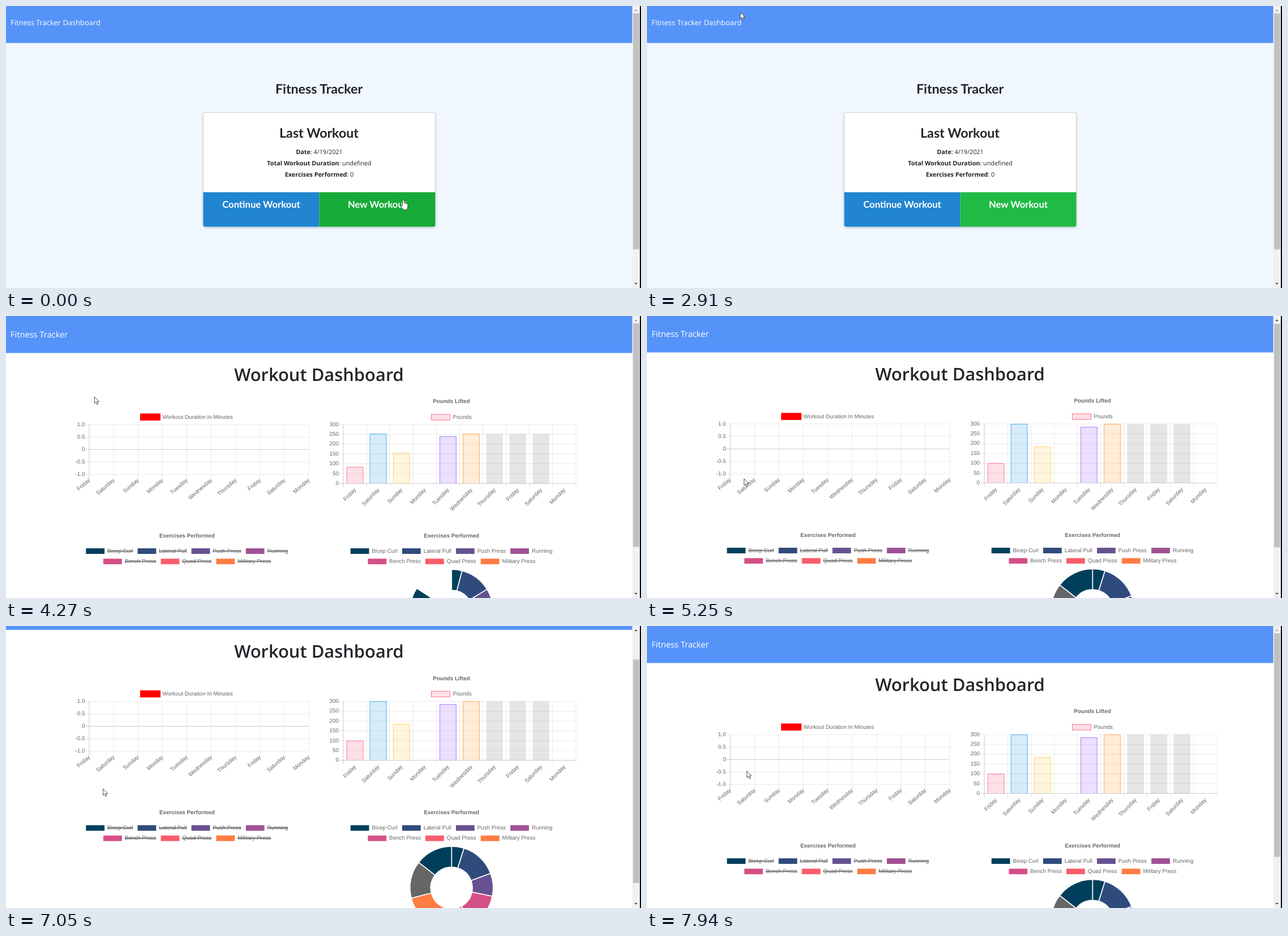
Animation, 1122 px wide and 499 px high, one loop 8 s. Source, as an HTML page with a canvas:

```html
<!DOCTYPE html>
<html lang="en">
<head>
<meta charset="utf-8">
<title>Fitness Tracker</title>
<style>
  html, body { margin: 0; width: 100%; height: 100%; overflow: hidden; background: #fff; }
  canvas { display: block; }
</style>
</head>
<body>
<canvas id="stage" width="1122" height="499"></canvas>
<script>
const ctx = document.getElementById('stage').getContext('2d');
ctx.textRendering = 'geometricPrecision';
const LOOP = 8000, W = 1122, H = 499;
const UI = '"Open Sans", "Noto Sans", sans-serif';
const LATO = 'Lato, sans-serif';
const CHART = '"Liberation Sans", Arial, sans-serif';
const BLUE = '#5593f9', INK = '#212529', GREY = '#666';
const FS = 9.84, UNIT = 0.82;
const DAYS = ['Friday', 'Saturday', 'Sunday', 'Monday', 'Tuesday', 'Wednesday',
              'Thursday', 'Friday', 'Saturday', 'Monday'];
const POUNDS = [100, 300, 185, 0, 285, 300, 300, 300, 300, 0];
const BAR_RGB = ['255,99,132', '54,162,235', '255,206,86', '75,192,192', '153,102,255', '255,159,64'];
const PALETTE = ['#003f5c', '#2f4b7c', '#665191', '#a05195', '#d45087', '#f95d6a', '#ff7c43'];
const LIFTS = ['Bicep Curl', 'Lateral Pull', 'Push Press', 'Running',
               'Bench Press', 'Quad Press', 'Military Press'];

// Pointer moves: start, end, number of steps, cubic path
const MOVES = [
  [310, 880, 7, [702, 343], [600, 320], [440, 190], [381, 126]],
  [1070, 1850, 9, [381, 126], [235, 270], [420, 370], [624, 345]],
  [2140, 2620, 6, [624, 345], [500, 250], [280, 60], [173, 3]],
  [2810, 3200, 5, [173, 3], [166, 10], [155, 18], [148, 25]],
  [3900, 4670, 9, [148, 25], [150, 110], [165, 230], [171, 287.5]],
  [7050, 7340, 4, [171, 287.5], [171, 287.5], [176, 262], [176, 257]],
  [7940, 7940, 1, [176, 257], [176, 257], [176, 256], [176, 256]]
];

const clamp = v => Math.max(0, Math.min(1, v));
const smooth = p => { p = clamp(p); return p * p * (3 - 2 * p); };
const stepAt = (t, a, b, n) =>
  n < 2 ? 0 : Math.min(n - 1, Math.floor((t - a) / (b - a) * (n - 1) + 0.06));

function rect(x, y, w, h, color) {
  ctx.fillStyle = color;
  ctx.fillRect(x, y, w, h);
}

function line(x1, y1, x2, y2, color, width = 1) {
  ctx.strokeStyle = color;
  ctx.lineWidth = width;
  ctx.beginPath();
  ctx.moveTo(x1, y1);
  ctx.lineTo(x2, y2);
  ctx.stroke();
}

function text(str, x, y, font, color, align = 'left', base = 'alphabetic') {
  ctx.font = font;
  ctx.fillStyle = color;
  ctx.textAlign = align;
  ctx.textBaseline = base;
  ctx.fillText(str, x, y);
}

const label = (str, x, y, align, bold = '') =>
  text(str, x, y, `${bold} ${FS}px ${CHART}`, GREY, align, 'middle');

function pointer(t) {
  let pos = MOVES[0][3];
  for (const [a, b, n, p0, p1, p2, p3] of MOVES) {
    if (t < a) break;
    // The pointer rests while the page first scrolls back
    const u = smooth((stepAt(t, a, b, n) + (a === 7050 ? 0 : 1)) / (a === 7050 ? n - 1 : n)), v = 1 - u;
    pos = [0, 1].map(i => v * v * v * p0[i] + 3 * v * v * u * p1[i] + 3 * v * u * u * p2[i] + u * u * u * p3[i]);
  }
  return pos;
}

function scrollTop(t) {
  const max = 97.5;
  if (t < 5250) return 0;
  if (t < 7050) return max * smooth(0.06 + 0.32 * stepAt(t, 5250, 5540, 4));
  return max * (1 - smooth(0.432 + 0.32 * stepAt(t, 7050, 7340, 4)));
}

function drawPointer(x, y, hand) {
  ctx.save();
  ctx.translate(x, y);
  const shape = new Path2D(hand
    ? 'M-1.6 1.5Q0-.6 1.6 1.5V6Q3 5.2 4 6.4Q5.5 5.8 6.4 7.2Q8 7 8 8.6V12Q7.6 15 6.4 17.6H0L-4 11.6Q-4.6 9.4-2.6 10L-1.6 11Z'
    : 'M.5.5V12.2L3.2 9.7L5 14L7 13.2L5.2 9H8.8Z');
  ctx.fillStyle = '#fff';
  ctx.fill(shape);
  ctx.strokeStyle = '#222';
  ctx.lineWidth = 0.8;
  ctx.stroke(shape);
  ctx.restore();
}

function arrow(y, dir, on) {
  ctx.fillStyle = on ? '#505050' : '#a3a3a3';
  ctx.beginPath();
  ctx.moveTo(1110, y + 1.5 * dir);
  ctx.lineTo(1116, y + 1.5 * dir);
  ctx.lineTo(1113, y - 1.5 * dir);
  ctx.fill();
}

function scrollbar(top, height, up, down) {
  rect(1106.5, 0, 13.5, H, '#f1f1f1');
  rect(1108, top, 11, height, '#c1c1c1');
  arrow(7.5, 1, up);
  arrow(491.5, -1, down);
}

function fact(name, value, y) {
  const bold = `700 10.8px ${UI}`, plain = `400 10.8px ${UI}`;
  ctx.font = bold;
  const w1 = ctx.measureText(name).width;
  ctx.font = plain;
  const x = 553.5 - (w1 + ctx.measureText(value).width) / 2;
  text(name, x, y, bold, INK);
  text(value, x + w1, y, plain, INK);
}

function home(x, y, onLink) {
  const inRow = y > 329 && y < 391;
  const overBlue = inRow && x > 348 && x < 553.5;
  const overGreen = inRow && x >= 553.5 && x < 759;
  rect(0, 0, W, H, '#f0f7ff');
  rect(0, 0, 1107, 65.5, BLUE);
  text('Fitness Tracker Dashboard', 8, 34, `400 12.9px ${UI}`, '#fff');
  if (onLink) rect(100, 36, 67, 1, '#fff');
  text('Fitness Tracker', 553, 155, `700 23.2px ${LATO}`, INK, 'center');

  ctx.save();
  ctx.shadowColor = 'rgba(34,36,38,.25)';
  ctx.shadowBlur = 4;
  ctx.shadowOffsetY = 1.5;
  ctx.fillStyle = '#fff';
  ctx.beginPath();
  ctx.roundRect(348.5, 188.5, 410, 202, 3.5);
  ctx.fill();
  ctx.restore();
  ctx.strokeStyle = '#d4d4d5';
  ctx.lineWidth = 1;
  ctx.stroke();
  ctx.save();
  ctx.clip();
  rect(348, 329.5, 205.5, 62, overBlue ? '#1678c2' : '#2185d0');
  rect(553.5, 329.5, 206, 62, overGreen ? '#16ab39' : '#21ba45');
  ctx.restore();

  text('Last Workout', 553, 232.5, `700 23.2px ${LATO}`, INK, 'center');
  fact('Date', ': 4/19/2021', 262);
  fact('Total Workout Duration', ': undefined', 282);
  fact('Exercises Performed', ': 0', 301.5);
  text('Continue Workout', 451, 357, `700 16.6px ${LATO}`, '#fff', 'center');
  text('New Workout', 656, 357, `700 16.6px ${LATO}`, '#fff', 'center');
  scrollbar(13, 417.5, false, true);
  return overBlue || overGreen || onLink;
}

function dayLabels(x0, dx, y, deg) {
  DAYS.forEach((day, i) => {
    ctx.save();
    ctx.translate(x0 + i * dx, y);
    ctx.rotate(-deg * Math.PI / 180);
    label(day, 0, 0, 'right');
    ctx.restore();
  });
}

function grid(x0, x1, y0, y1, cols, rows, zeroRow, tail) {
  const soft = 'rgba(0,0,0,.1)', firm = 'rgba(0,0,0,.25)';
  for (let i = 0; i <= rows; i++) {
    const y = y0 + (y1 - y0) * i / rows;
    line(x0 - 7, y, x1, y, i === zeroRow ? firm : soft, UNIT);
  }
  for (let i = 0; i <= cols; i++) {
    const x = x0 + (x1 - x0) * i / cols;
    line(x, y0, x, y1 + tail, i ? soft : firm, UNIT);
  }
}

function durationChart() {
  rect(237, 172.5, 36, 12.5, '#f00');
  label('Workout Duration In Minutes', 276.5, 179, 'left');
  grid(147, 535, 192, 280.5, 9, 4, 2, 7);
  ['1.0', '0.5', '0', '-0.5', '-1.0'].forEach((s, i) => label(s, 139.5, 192 + i * 22.1, 'right'));
  dayLabels(147.5, 43.1, 289.5, 41);
}

function poundsChart(grow) {
  const x0 = 596, x1 = 1007, y0 = 192, y1 = 296.3, dx = (x1 - x0) / 10;
  label('Pounds Lifted', 787, 151.5, 'center', 'bold');
  ctx.lineWidth = 1;
  ctx.strokeStyle = 'rgba(255,99,132,.9)';
  rect(751.5, 174, 33, 10, 'rgba(255,99,132,.2)');
  ctx.strokeRect(751.5, 174, 33, 10);
  label('Pounds', 789.5, 179, 'left');
  grid(x0, x1, y0, y1, 10, 6, 6, 7);
  for (let i = 0; i <= 6; i++) label(String(300 - 50 * i), 588, y0 + (y1 - y0) * i / 6, 'right');
  POUNDS.forEach((v, i) => {
    if (!v) return;
    const w = dx * 0.72, x = x0 + dx * (i + 0.5) - w / 2, top = y1 - (y1 - y0) * v / 300 * grow;
    const rgb = BAR_RGB[i];
    rect(x, top, w, y1 - top, rgb ? `rgba(${rgb},.2)` : 'rgba(0,0,0,.1)');
    if (!rgb) return;
    ctx.strokeStyle = `rgb(${rgb})`;
    ctx.lineWidth = UNIT;
    ctx.beginPath();
    ctx.moveTo(x + 0.4, y1);
    ctx.lineTo(x + 0.4, top + 0.4);
    ctx.lineTo(x + w - 0.4, top + 0.4);
    ctx.lineTo(x + w - 0.4, y1);
    ctx.stroke();
  });
  dayLabels(x0 + dx / 2 + 0.5, dx, 306.5, 46);
}

function liftLegend(left, struck) {
  label('Exercises Performed', left + 178.5, 389, 'center', 'bold');
  let x = left;
  LIFTS.forEach((name, i) => {
    if (i === 4) x = left + 30.7;
    const y = i < 4 ? 416 : 434.3;
    rect(x, y - 4.9, 32.8, 9.84, PALETTE[i]);
    const tx = x + 32.8 + FS / 2;
    label(name, tx, y, 'left');
    const w = ctx.measureText(name).width;
    if (struck) line(tx, y, tx + w, y, GREY, 1.6);
    x = tx + w + 10 * UNIT;
  });
}

function donut(grow) {
  const cx = 787.3, cy = 522, total = POUNDS.reduce((a, b) => a + b);
  let from = -Math.PI / 2;
  POUNDS.forEach((v, i) => {
    if (!v) return;
    const to = from + v / total * Math.PI * 2 * grow;
    ctx.beginPath();
    ctx.arc(cx, cy, 73.5, from, to);
    ctx.arc(cx, cy, 36.8, to, from, true);
    ctx.closePath();
    ctx.fillStyle = i === 7 ? GREY : PALETTE[i % 8];
    ctx.fill();
    ctx.strokeStyle = '#fff';
    ctx.lineWidth = 2 * UNIT;
    ctx.stroke();
    from = to;
  });
}

function dashboard(t) {
  const loaded = t >= 3900, top = scrollTop(t);
  rect(0, 0, W, H, '#fff');
  ctx.save();
  ctx.translate(0, -top);
  rect(0, 0, W, 65.5, BLUE);
  text('Fitness Tracker', 8, 38, `400 14.65px ${UI}`, '#fff');
  text('Workout Dashboard', loaded ? 553 : 560, 115, `600 30.9px ${UI}`, INK, 'center');
  if (loaded) {
    const step = t >= 4760 ? 9 : stepAt(t, 3900, 4670, 9);
    const grow = 1 - Math.pow(1 - clamp(0.08 + step * 0.0965), 4);
    durationChart();
    poundsChart(grow);
    liftLegend(141.3, true);
    liftLegend(608.7, false);
    donut(grow);
  }
  ctx.restore();
  if (loaded) scrollbar(13 + top * 0.79, 395.5, top > 0.5, top < 97);
}

function draw(t) {
  const [x, y] = pointer(t);
  let hand;
  if (t < 3700) {
    hand = home(x, y, x > 98 && x < 168 && y > 15 && y < 40);
  } else {
    dashboard(t);
    hand = t < 3900;
  }
  rect(1120, 0, 2, H, '#000');
  drawPointer(x, y, hand);
}

const start = performance.now();
function tick() {
  draw((performance.now() - start) % LOOP);
  requestAnimationFrame(tick);
}
tick();
</script>
</body>
</html>
```
